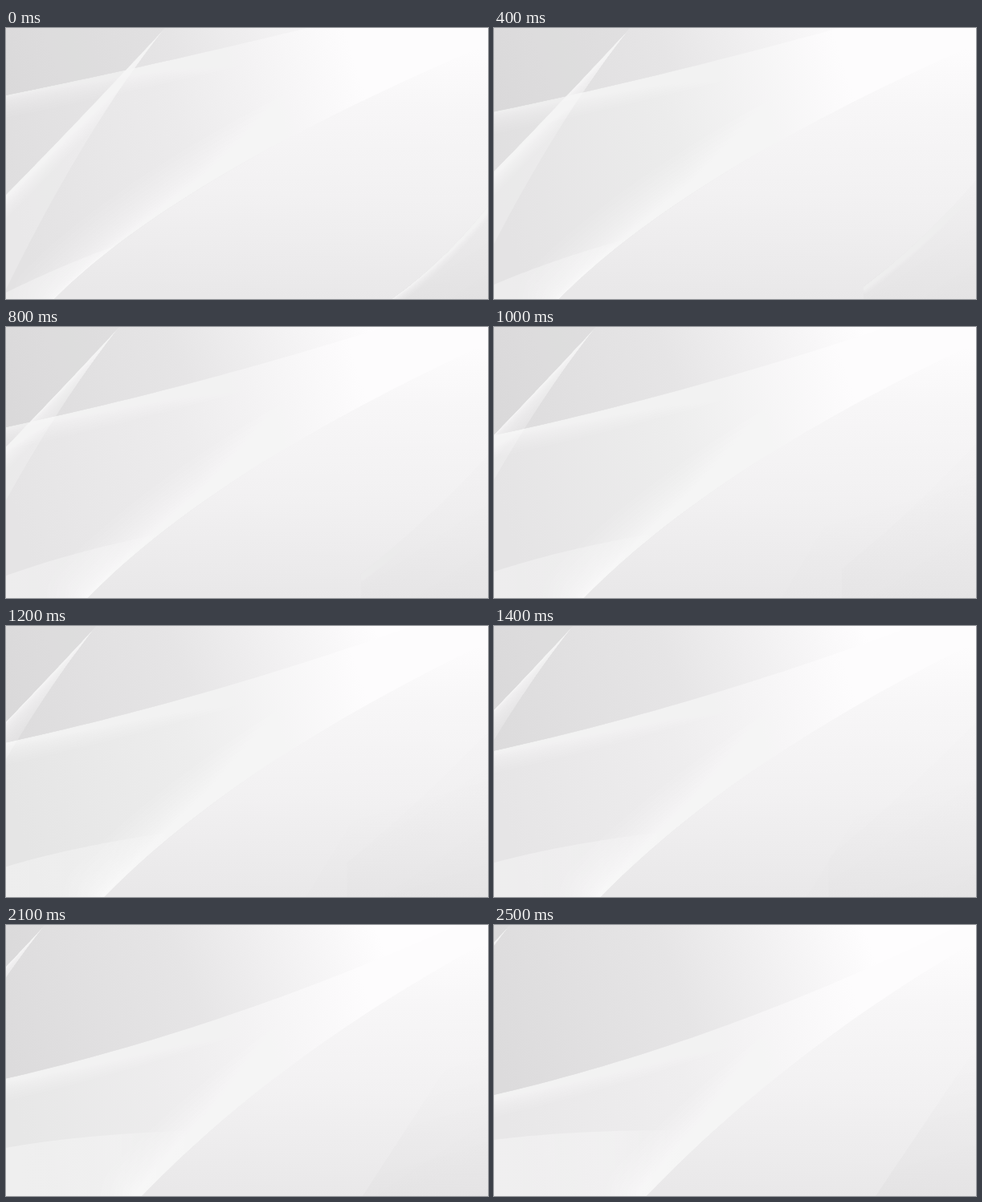
An HTML page with a canvas that plays this animation: 600x338 px, repeating every 5000 ms.

```html
<!DOCTYPE html>
<html lang="en">
<head>
<meta charset="utf-8">
<title>Soft light sheets</title>
<style>
  html, body { margin: 0; width: 100%; height: 100%; overflow: hidden; background: #f0eff0; }
  canvas { display: block; width: 100%; height: 100%; }
</style>
</head>
<body>
<canvas id="stage" width="600" height="338"></canvas>
<script>
const W = 600, H = 338, LOOP = 5000, STEP = 100, STEPS = 25;
const ctx = document.getElementById('stage').getContext('2d');

const lerp = (a, b, t) => a + (b - a) * t;
const gray = v => `rgb(${v},${v - 0.7},${v})`;
const white = a => `rgba(255,255,255,${a})`;
const black = a => `rgba(0,0,0,${a})`;

const sample = (point, n = 40) => Array.from({ length: n + 1 }, (_, i) => point(i / n));

// Points of y = f(x) between two x positions.
const graph = (f, from, to) => sample(s => {
  const x = lerp(from, to, s);
  return [x, f(x)];
});

// Points of a quadratic curve from a to b, pulled towards c.
const bend = (a, c, b) => sample(s =>
  a.map((v, k) => (1 - s) ** 2 * v + 2 * s * (1 - s) * c[k] + s * s * b[k]));

function line(points) {
  const path = new Path2D();
  points.forEach(p => path.lineTo(...p));
  return path;
}

function area(...points) {
  const path = line(points);
  path.closePath();
  return path;
}

function gradient(x1, y1, x2, y2, ...stops) {
  const g = ctx.createLinearGradient(x1, y1, x2, y2);
  stops.forEach(([offset, color]) => g.addColorStop(offset, color));
  return g;
}

function fill(path, style) {
  ctx.fillStyle = style;
  ctx.fill(path);
}

// A glow along a curve, kept to one side of it by the clip.
function glow(clip, points, reach, strength, tint = white) {
  const layers = 16, path = line(points);
  ctx.save();
  ctx.clip(clip);
  ctx.lineCap = ctx.lineJoin = 'round';
  ctx.strokeStyle = tint(strength / layers);
  for (let i = 1; i <= layers; i++) {
    ctx.lineWidth = 2 * reach * (i / layers) ** 2 + 2;
    ctx.stroke(path);
  }
  ctx.restore();
}

function drawBackdrop() {
  ctx.fillStyle = gradient(0, 160, 460, 0, [0, gray(220)], [0.5, gray(230)], [1, gray(254)]);
  ctx.fillRect(0, 0, W, H);
}

function drawUpper(t) {
  const edge = graph(x => lerp(84, 212, t) - lerp(0.205, 0.235, t) * x
    - lerp(0.00005, 0.000225, t) * x * x, -40, W);
  const sheet = area(...edge, [W, H], [-40, H]);
  fill(sheet, gradient(0, 200, 440, 60,
    [0, gray(lerp(227, 232, t))], [0.5, gray(lerp(236, 239, t))], [1, gray(253)]));
  glow(sheet, edge, 26, 0.55);
}

function drawSteep(t) {
  const top = lerp(198, 20, t);
  const drop = (slope, curve) => graph(x => {
    const d = top - x;
    return slope * d + curve * d * Math.abs(d);
  }, top + 30, -60);
  const outer = drop(1.08, -0.00015), inner = drop(1.25, 0.002);
  const strip = area(...outer, ...inner.slice().reverse());
  fill(area(...outer, [-60, -40]), black(0.015));
  glow(area(...inner, [W, H], [W, -40]), inner, 60, 0.03 * (1 - t), black);
  fill(strip, white(0.2));
  glow(strip, outer, 20, 0.6);
}

function drawCentral(t) {
  const edge = bend([lerp(60, 190, t), H], [lerp(210, 365, t), lerp(187, 156, t)], [W, 20]);
  const tip = lerp(180, 250, t);
  const rim = bend([0, lerp(330, 268, t)], [lerp(80, 100, t), lerp(290, 255, t)], [tip, 256]);
  const low = area(...rim, [tip, H], [0, H]);
  glow(area(...edge, [W, 0], [0, 0], [0, H]), edge, 50, 0.72);
  fill(low, gradient(0, 0, tip, 0, [0, white(0.34)], [0.6, white(0.28)], [1, white(0)]));
  fill(area(...edge, [W, H]), gradient(420, 20, 410, H,
    [0, gray(253)], [0.25, gray(247)], [0.6, gray(242)], [1, gray(233)]));
}

function drawCorner(t) {
  const u = t * (1.3 - 0.3 * t);
  const start = [lerp(480, 380, u), lerp(H, 260, u)];
  const edge = bend(start, [lerp(545, 490, u), lerp(292, 165, u)], [W, lerp(222, 60, u)]);
  const right = area(...edge, [W, H], [start[0], H]);
  const early = Math.max(0, 1 - t * 1.1), late = Math.max(0, (t - 0.3) / 0.7);
  fill(right, gradient(520, 190, 610, 330, [0, black(0.006 * early)], [1, black(0.03 * early)]));
  glow(right, edge, 9, 0.55 * early);
  const crease = area([lerp(280, 475, t), H], [lerp(390, 615, t), 130], [W + 20, 130], [W + 20, H]);
  fill(crease, gradient(530, 170, 580, H,
    [0, black(0)], [0.45, black(0.014 * late)], [1, black(0.024 * late)]));
}

const layers = [drawBackdrop, drawUpper, drawSteep, drawCentral, drawCorner];

let shown = -1;
const began = performance.now();
function tick(now) {
  const elapsed = Math.max(0, now - began) % LOOP;
  const step = Math.min(Math.floor(elapsed / STEP), STEPS);
  if (step !== shown) {
    shown = step;
    layers.forEach(drawLayer => drawLayer(step / STEPS));
  }
  requestAnimationFrame(tick);
}
tick(began);
</script>
</body>
</html>
```
